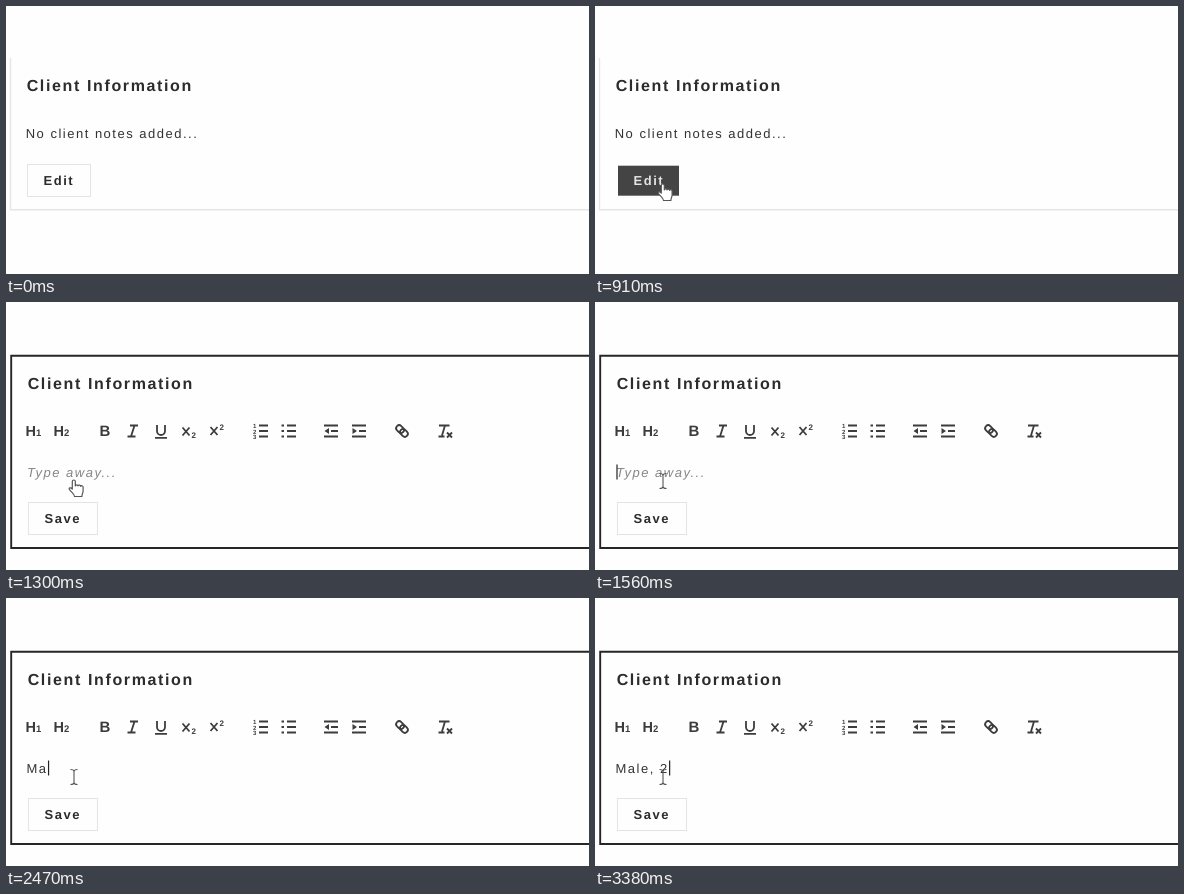
An HTML page that plays this animation: 583x268 px, repeating every 3.64 s.

```html
<!DOCTYPE html>
<html lang="en">
<head>
<meta charset="utf-8">
<style>
html, body { margin: 0; height: 100%; overflow: hidden; background: #fefefe; }
svg { display: block; width: 583px; height: 268px; font: 13px "Liberation Sans", Arial, sans-serif; letter-spacing: 1.5px; fill: #333; }
text { white-space: pre; text-rendering: geometricPrecision; }
.bold { font-weight: bold; fill: #2c2c2c; }
.title { font-size: 16px; letter-spacing: 1.63px; }
.line { fill: none; stroke: #3c3c3c; stroke-width: 1.8; }
#tools text { letter-spacing: 0; fill: #3c3c3c; font-weight: bold; }
.cursor { fill: #fff; stroke: #555; stroke-width: 1.2; stroke-linejoin: round; }
</style>
</head>
<body>
<svg viewBox="0 0 583 268">
  <g id="view">
    <path d="M4.5 52V203.7H583" fill="none" stroke="#e6e6e6" stroke-width="1.4"/>
    <text class="bold title" x="20.7" y="85">Client Information</text>
    <text x="19.7" y="132.4">No client notes added...</text>
    <rect id="edit" x="21.5" y="158.5" width="63" height="32"/>
    <text id="editLabel" class="bold" y="179.4">Edit</text>
  </g>
  <g id="editor">
    <path d="M583 53.8H5.2V246H583" fill="none" stroke="#262626" stroke-width="1.9"/>
    <text class="bold title" x="21.7" y="87">Client Information</text>
    <g id="tools">
      <text x="19.5" y="134" font-size="14.5">H<tspan font-size="9.5">1</tspan></text>
      <text x="47.5" y="134" font-size="14.5">H<tspan font-size="9.5">2</tspan></text>
      <text x="93.5" y="134" font-size="15">B</text>
      <path class="line" d="M124 123.5H132M121.5 134.5H129.5M128.5 123.5L125 134.5M149 135.8H161"/>
      <path class="line" d="M151 123V129a4 4 0 0 0 8 0V123"/>
      <path class="line" d="M176.5 125.5L183.5 133.5M183.5 125.5L176.5 133.5M204.5 125L211.5 133M211.5 125L204.5 133"/>
      <text x="185.5" y="136" font-size="8">2</text>
      <text x="213.5" y="128" font-size="8">2</text>
      <path class="line" d="M253 123.5H262M253 129H262M253 134.5H262M281 123.5H290M281 129H290M281 134.5H290"/>
      <path class="line" d="M275.5 123.5H278M275.5 129H278M275.5 134.5H278"/>
      <text x="247" y="126" font-size="6">1</text>
      <text x="247" y="131.5" font-size="6">2</text>
      <text x="247" y="137" font-size="6">3</text>
      <path class="line" d="M318 123.5H332M318 134.5H332M325 129H332M346 123.5H360M346 134.5H360M353 129H360"/>
      <path d="M323 126V132L318.5 129zM346.5 126V132L351 129z" fill="#3c3c3c"/>
      <g class="line" transform="translate(396 129) rotate(45)">
        <rect x="-7" y="-3" width="8.5" height="6" rx="3"/>
        <rect x="-1.5" y="-3" width="8.5" height="6" rx="3"/>
      </g>
      <path class="line" d="M433 123.5H443.5M439 123.5L436 133.5M432.5 134.5H438.5M441 130.5L446 135.5M446 130.5L441 135.5"/>
    </g>
    <text id="hint" x="21" y="174.5" font-style="italic" fill="#858585">Type away...</text>
    <text id="note" x="20.5" y="174.5"></text>
    <path id="caret" d="M0 162.5V177.5" stroke="#222" stroke-width="1.2"/>
    <rect x="22.5" y="200.5" width="69" height="32" fill="#fefefe" stroke="#e4e4e4"/>
    <text class="bold" x="38.5" y="221.4">Save</text>
  </g>
  <path id="arrow" class="cursor" d="M0 0V14l3.3-3 2 5 2.2-1-2-4.7H10z"/>
  <path id="hand" class="cursor" d="M4 10V2.5a1.5 1.5 0 0 1 3 0V7c0-1.6 2.6-1.6 2.8 0 .2-1.2 2.5-1.2 2.7 .3 .3-1 2.3-.8 2.3 .8v4c0 2-1.2 2.6-1.2 5.4H6.2C6 14.5 2.5 13 1 10.2c-.7-1.4 1.3-2.2 3-.2z"/>
  <path id="beam" d="M64.5 171.5q3.5 0 3.5 2q0-2 3.5-2M68 173V185M64.5 186.5q3.5 0 3.5-2q0 2 3.5 2" fill="none" stroke="#555" stroke-width="1.1"/>
</svg>
<script>
const STEP = 130, LOOP = 3640;
const keyTimes = [2080, 2470, 2600, 2730, 3120, 3250, 3380];
const $ = id => document.getElementById(id);
const show = (id, on) => $(id).style.display = on ? "" : "none";
const set = (id, name, value) => $(id).setAttribute(name, value);

function draw(now) {
  const t = Math.floor(now % LOOP / STEP) * STEP;
  const editing = t >= 1040, pressed = t === 910;
  show("view", !editing);
  show("editor", editing);

  // The pressed button is dark, without its outline, and nudged right and down.
  set("edit", "fill", pressed ? "#444" : t >= 650 ? "#fafafa" : "#fefefe");
  set("edit", "stroke", pressed ? "#fefefe" : "#e4e4e4");
  set("edit", "stroke-width", pressed ? 2 : 1);
  set("edit", "transform", pressed ? "translate(.5 .2)" : "");
  set("editLabel", "x", pressed ? 38.6 : 37.6);
  $("editLabel").style.fill = pressed ? "#e4e4e4" : "";

  const fade = Math.min(1, Math.max(0, 0.1 + (t - 1040) / 260 * 0.9));
  set("tools", "opacity", fade);
  set("hint", "opacity", fade);

  const typed = keyTimes.filter(k => t >= k).length;
  $("note").textContent = "Male, 2".slice(0, typed);
  show("hint", !typed);
  show("caret", t >= 1430 && t !== 1950);
  const caretX = typed && editing ? 21.5 + $("note").getComputedTextLength() : 22;
  set("caret", "transform", `translate(${caretX})`);

  // The pointer slows down as it reaches the button.
  const rest = Math.max(0, 1 - Math.max(0, t - 130) / 650) ** 1.45;
  const x = 62.3 + 72 * rest, y = 177 + 62 * rest;
  set("arrow", "transform", `translate(${x + 5} ${y + 1})`);
  set("hand", "transform", `translate(${x} ${y})`);
  show("arrow", t >= 130 && t < 650);
  show("hand", t >= 650 && t < 1430);
  show("beam", t >= 1430);
}

const start = performance.now();
function tick() {
  draw(performance.now() - start);
  requestAnimationFrame(tick);
}
tick();
</script>
</body>
</html>
```
